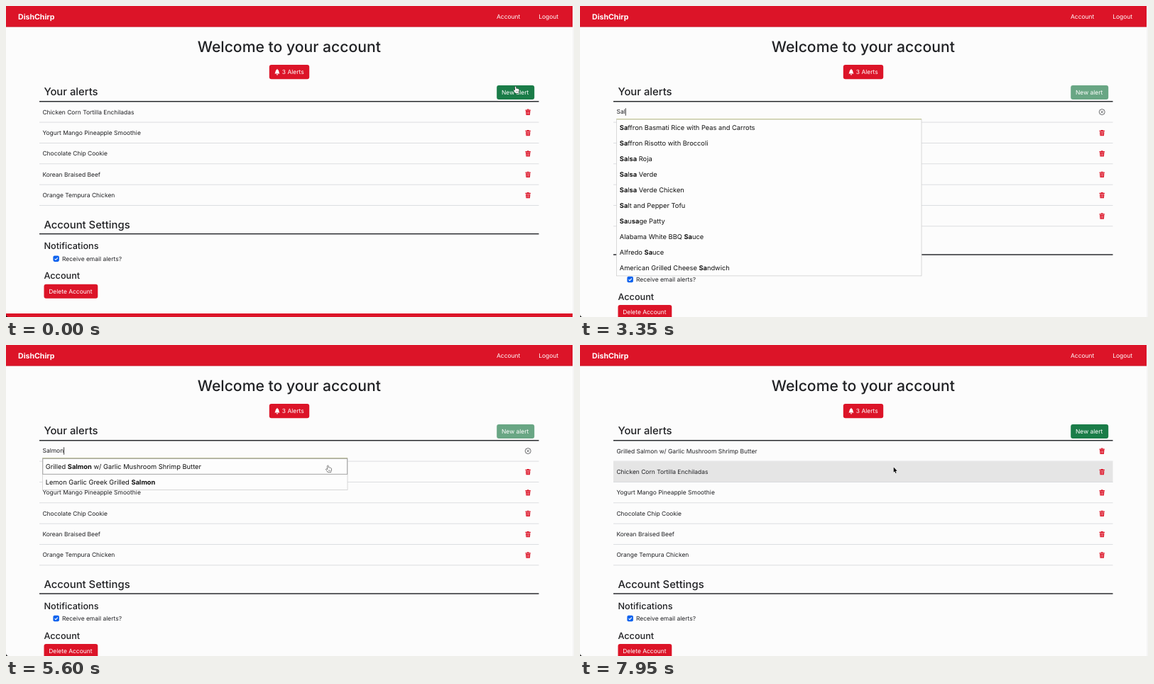
Recreate the animation shown at these times as an HTML page with a canvas. Size 800 px wide and 439 px high, loop 8000 ms.

```html
<!DOCTYPE html>
<html lang="en">
<head>
<meta charset="utf-8">
<title>Menu alerts</title>
<style>
  html, body { margin: 0; width: 100%; height: 100%; overflow: hidden; background: #fcfcfc; }
  canvas { display: block; width: 800px; height: 439px; }
</style>
</head>
<body>
<canvas id="stage"></canvas>
<script>
const W = 800, H = 439, LOOP = 8000;
const canvas = document.getElementById('stage');
const dpr = window.devicePixelRatio || 1;
canvas.width = Math.round(W * dpr);
canvas.height = Math.round(H * dpr);
const ctx = canvas.getContext('2d');

const REM = 16 * W / 1512;
const INK = '#202124', RED = '#dc1428', GREEN = '#1a7c48', PAPER = '#fcfcfc';
const LEFT = 47, RIGHT = 750.5, TOP = 135.2, ROW = 29.35;
const MENU = { x: 51.5, y: 160, w: 429.5, item: 22.05 };

const ALERTS = [
  'Chicken Corn Tortilla Enchiladas', 'Yogurt Mango Pineapple Smoothie',
  'Chocolate Chip Cookie', 'Korean Braised Beef', 'Orange Tempura Chicken'
];
const PICK = 'Grilled Salmon w/ Garlic Mushroom Shrimp Butter';
const FOODS = [
  'Saffron Basmati Rice with Peas and Carrots', 'Saffron Risotto with Broccoli',
  'Salsa Roja', 'Salsa Verde', 'Salsa Verde Chicken', 'Salt and Pepper Tofu',
  'Sausage Patty', 'Alabama White BBQ Sauce', 'Alfredo Sauce',
  'American Grilled Cheese Sandwich', PICK, 'Lemon Garlic Greek Grilled Salmon'
];

const WORD = 'Salmon';
const KEYS = [2700, 2950, 3300, 3600, 3900, 4150];
const FETCH = 150;
const PRESS = 880, OPEN = 1000, MOVE = 4900, ARRIVE = 5700, CLOSE = 7000, SAVED = 7100;

const clamp = v => Math.max(0, Math.min(1, v));
const ease = v => { v = clamp(v); return v * v * (3 - 2 * v); };
const lerp = (a, b, k) => a + (b - a) * k;

function text(str, x, y, { rem = 1, weight = 400, color = INK, align = 'left' } = {}) {
  ctx.font = `${weight} ${rem * REM}px Inter, "Open Sans", sans-serif`;
  ctx.fillStyle = color;
  ctx.textAlign = align;
  ctx.fillText(str, x, y);
  return ctx.measureText(str).width;
}

function rect(x, y, w, h, color) {
  ctx.fillStyle = color;
  ctx.fillRect(x, y, w, h);
}

function round(x, y, w, h, r, color) {
  ctx.fillStyle = color;
  ctx.beginPath();
  ctx.roundRect(x, y, w, h, r);
  ctx.fill();
}

function line(points, color, width) {
  ctx.strokeStyle = color;
  ctx.lineWidth = width;
  ctx.beginPath();
  for (const [x, y] of points) ctx.lineTo(x, y);
  ctx.stroke();
}

function at(x, y, draw) {
  ctx.save();
  ctx.translate(x, y);
  draw();
  ctx.restore();
}

function bell(x, y) {
  at(x, y, () => {
    ctx.fillStyle = '#fff';
    ctx.beginPath();
    ctx.moveTo(-3.7, 2.4);
    ctx.bezierCurveTo(-2, 1, -3, -3.2, 0, -3.4);
    ctx.bezierCurveTo(3, -3.2, 2, 1, 3.7, 2.4);
    ctx.fill();
    ctx.fillRect(-0.5, -4.3, 1, 1.2);
    ctx.beginPath();
    ctx.arc(0, 3, 1.2, 0, Math.PI);
    ctx.fill();
  });
}

function trash(x, y) {
  at(x, y, () => {
    round(-3.8, -3.4, 7.6, 1.3, 0.5, RED);
    round(-1.4, -4.2, 2.8, 1.2, 0.4, RED);
    ctx.beginPath();
    ctx.moveTo(-3.2, -1.7);
    ctx.lineTo(3.2, -1.7);
    ctx.lineTo(2.7, 4.1);
    ctx.lineTo(-2.7, 4.1);
    ctx.fill();
    for (const dx of [-1.4, 0, 1.4]) line([[dx, -0.8], [dx * 0.9, 3.1]], '#f6c5ca', 0.5);
  });
}

function cancel(x, y) {
  at(x, y, () => {
    ctx.strokeStyle = '#3b3d40';
    ctx.lineWidth = 0.75;
    ctx.beginPath();
    ctx.arc(0, 0, 4, 0, Math.PI * 2);
    ctx.stroke();
    line([[-1.6, -1.6], [1.6, 1.6]], '#3b3d40', 0.8);
    line([[1.6, -1.6], [-1.6, 1.6]], '#3b3d40', 0.8);
  });
}

function checkbox(x, y) {
  round(x, y, 8.5, 8.5, 2.1, '#0d62ee');
  line([[x + 2.2, y + 4.4], [x + 3.7, y + 5.9], [x + 6.4, y + 2.9]], '#fff', 1.1);
}

function polygon(points, fill, stroke, width) {
  ctx.beginPath();
  for (const [x, y] of points) ctx.lineTo(x, y);
  ctx.closePath();
  ctx.lineJoin = 'round';
  ctx.strokeStyle = stroke;
  ctx.lineWidth = width;
  ctx.stroke();
  ctx.fillStyle = fill;
  ctx.fill();
}

function arrow() {
  polygon([[0, 0], [0, 7.2], [1.6, 5.8], [2.7, 8.4], [3.9, 7.9], [2.8, 5.4], [5, 5.3]],
    '#0a0a0a', '#fff', 1);
}

function hand() {
  polygon([[-0.7, 0.5], [0, 0], [0.8, 0.5], [1, 3.3], [2.3, 3.1], [3.6, 3.6], [4.9, 4.1],
    [5.2, 6], [4.4, 8], [4.2, 9.4], [0, 9.4], [-1.2, 7.4], [-2.6, 5.5], [-2, 4.8], [-0.4, 5.8]],
    '#fff', '#1b1b1b', 1);
  for (const dx of [1.1, 2.4, 3.6]) line([[dx, 6.1], [dx, 8]], '#333', 0.4);
}

function cursorAt(t) {
  if (t < KEYS[0]) return { x: 717.5, y: lerp(113.5, 117.5, ease((t - 300) / 500)) };
  if (t < MOVE) return null;
  const k = ease((t - MOVE) / (ARRIVE - MOVE));
  return { x: lerp(717.5, 441.7, k), y: lerp(117.5, 172.5, k) };
}

function stateAt(t) {
  const editing = t >= OPEN && t < CLOSE;
  const typed = KEYS.filter(k => k <= t).length;
  const query = WORD.slice(0, KEYS.filter(k => k + FETCH <= t).length);
  const options = editing && query.length > 1
    ? FOODS.filter(f => f.toLowerCase().includes(query.toLowerCase())).slice(0, 10) : [];
  const lastKey = typed ? KEYS[typed - 1] : OPEN;
  const mouse = cursorAt(t);
  const overMenu = !!mouse && options.length > 0 && mouse.x > MENU.x &&
    mouse.x < MENU.x + MENU.w && mouse.y > MENU.y;
  return {
    editing, query, options, mouse, overMenu,
    input: WORD.slice(0, typed),
    caret: (t - lastKey) % 1000 < 500,
    pressed: t >= PRESS && t < OPEN,
    pointer: t < PRESS || overMenu,
    rows: t >= SAVED ? [PICK, ...ALERTS] : ALERTS
  };
}

function button(label, x, y, w, textX, color) {
  round(x, y, w, 20.1, 3, color);
  text(label, textX, y + 13.2, { color: '#fff' });
}

function header() {
  rect(0, 0, 798, 29.4, RED);
  rect(0, 28.8, 798, 0.6, '#c01525');
  text('DishChirp', 17, 18.8, { rem: 1.25, weight: 700, color: '#fff' });
  text('Account', 691, 18, { color: '#fff' });
  text('Logout', 750.2, 18, { color: '#fff' });
  text('Welcome to your account', 398.8, 65.2, { rem: 2.5, weight: 500, align: 'center' });
  button('3 Alerts', 370.8, 83.1, 56.4, 388.8, RED);
  bell(382, 93.2);
}

function newAlert(s) {
  if (s.pressed) round(689.6, 110.3, 56.2, 23.4, 4.5, '#8fbfa5');
  button('New alert', 691.2, 112, 53, 698,
    s.editing ? '#69a684' : s.pressed ? '#175f38' : GREEN);
}

function inputRow(s) {
  const base = 152.4;
  const w = s.input ? text(s.input, 51.5, base)
    : (text('Type here', 51.8, base, { color: '#6a6f75' }), 0);
  if (s.caret) rect(51.6 + w, 144.3, 0.8, 10.4, '#111');
  rect(51.5, 159, MENU.w, 1.1, '#c8cba0');
  cancel(735.2, 149.6);
}

function alertRows(s) {
  const offset = s.editing ? 1 : 0;
  const count = s.rows.length + offset;
  const hovered = s.mouse && !s.overMenu && s.mouse.x < RIGHT
    ? Math.floor((s.mouse.y + 1 - TOP) / ROW) : -1;
  for (let i = 0; i < count; i++) {
    const y = TOP + i * ROW;
    if (i >= offset) {
      if (i === hovered) rect(LEFT, y, RIGHT - LEFT, ROW, '#e5e5e5');
      text(s.rows[i - offset], 51.4, y + 17.5);
      trash(735.2, y + 14.6);
    }
    rect(LEFT, y + ROW - 0.9, RIGHT - LEFT, 0.9, '#d9dbde');
  }
  rect(LEFT, 134, RIGHT - LEFT, 1.5, '#2b2d30');
  if (s.editing) inputRow(s);
  return (count - ALERTS.length) * ROW;
}

function settings(dy) {
  at(0, dy, () => {
    text('Account Settings', 53.4, 313.6, { rem: 1.75, weight: 500 });
    rect(LEFT, 320.9, RIGHT - LEFT, 1.5, '#2b2d30');
    text('Notifications', 53.4, 343.3, { rem: 1.5, weight: 500 });
    checkbox(66.4, 352.4);
    text('Receive email alerts?', 79, 359.8);
    text('Account', 53.4, 385.2, { rem: 1.5, weight: 500 });
    button('Delete Account', 53.5, 392.7, 75.8, 60.2, RED);
    rect(0, 434, 798, 30, RED);
  });
}

function menu(s) {
  if (!s.options.length) return;
  const { x, y, w, item } = MENU;
  const h = s.options.length * item;
  rect(x, y, w, h + 0.4, '#fdfdfd');
  ctx.strokeStyle = '#cfcfcf';
  ctx.lineWidth = 0.8;
  ctx.strokeRect(x, y, w, h + 0.4);
  rect(x, 159, w, 1.3, '#c8cba0');
  const matcher = new RegExp(`(${s.query})`, 'i');
  s.options.forEach((name, i) => {
    let tx = 55.8;
    name.split(new RegExp(matcher.source.length > 4 || !/sa/i.test(s.query)
      ? matcher.source : '(sa)', 'i')).forEach((part, j) => {
      if (part) tx += text(part, tx, y + i * item + 14.8,
        { rem: 1.1, weight: j % 2 ? 700 : 400, color: '#111' });
    });
  });
  if (s.overMenu) {
    const i = Math.floor((s.mouse.y - y) / item);
    ctx.strokeStyle = '#9b9b9b';
    ctx.lineWidth = 0.9;
    ctx.strokeRect(x + 0.3, y + i * item + 0.3, w - 0.6, item);
  }
}

function windowEdge() {
  rect(798, 0, 2, H, '#f5f5f5');
  ctx.fillStyle = '#111';
  ctx.beginPath();
  ctx.moveTo(0, 435.5);
  ctx.quadraticCurveTo(0.4, 438.6, 3.5, H);
  ctx.lineTo(0, H);
  ctx.fill();
}

function draw(t) {
  const s = stateAt(t);
  ctx.setTransform(dpr, 0, 0, dpr, 0, 0);
  ctx.textBaseline = 'alphabetic';
  ctx.textRendering = 'geometricPrecision';
  rect(0, 0, W, H, PAPER);
  header();
  text('Your alerts', 53.4, 126, { rem: 1.75, weight: 500 });
  newAlert(s);
  settings(alertRows(s));
  menu(s);
  windowEdge();
  if (s.mouse) at(s.mouse.x, s.mouse.y, s.pointer ? hand : arrow);
}

const start = performance.now();
function frame() {
  draw((performance.now() - start) % LOOP);
  requestAnimationFrame(frame);
}
frame();
</script>
</body>
</html>
```
